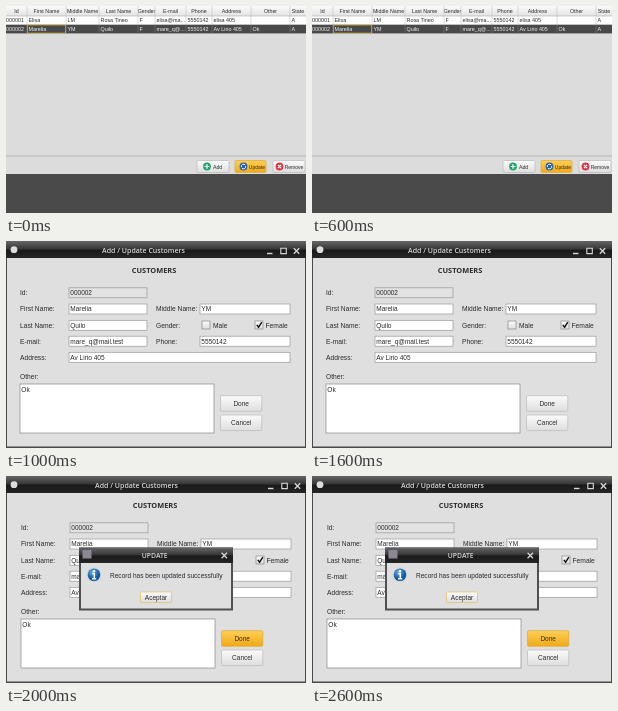
Write an HTML page that moves like this. It is 300 px wide and 207 px high and loops after 3000 ms.

```html
<!DOCTYPE html>
<html lang="en">
<head>
<meta charset="utf-8">
<title>Customer update</title>
<style>
  html, body { margin: 0; width: 100%; height: 100%; overflow: hidden; background: #dcdcdc; }
  svg { display: block; width: 100vw; height: 100vh; }
  text { font-family: "Liberation Sans", Arial, sans-serif; white-space: pre; }
  .title { font-family: "Open Sans", sans-serif; font-weight: 600; }
  .strong { font-family: "Open Sans", sans-serif; font-weight: 700; }
</style>
</head>
<body>
<svg id="stage" viewBox="0 0 300 207">
  <defs>
    <linearGradient id="bar" x2="0" y2="1">
      <stop offset="0" stop-color="#666"/><stop offset=".45" stop-color="#383838"/>
      <stop offset=".55" stop-color="#1a1a1a"/><stop offset="1" stop-color="#262626"/>
    </linearGradient>
    <linearGradient id="plain" x2="0" y2="1">
      <stop offset="0" stop-color="#fbfbfb"/><stop offset="1" stop-color="#dedede"/>
    </linearGradient>
    <linearGradient id="gold" x2="0" y2="1">
      <stop offset="0" stop-color="#ffcf55"/><stop offset="1" stop-color="#f0aa17"/>
    </linearGradient>
    <linearGradient id="head" x2="0" y2="1">
      <stop offset="0" stop-color="#fafafa"/><stop offset="1" stop-color="#e4e4e4"/>
    </linearGradient>
    <radialGradient id="blue" cx=".4" cy=".3">
      <stop offset="0" stop-color="#6fb4ee"/><stop offset="1" stop-color="#155a9e"/>
    </radialGradient>
  </defs>
</svg>
<script>
const stage = document.getElementById('stage');
const STEP = 1000;
const INK = '#2b2b2b', PALE = '#d8d8d8';

const rect = (x, y, w, h, fill, stroke = 'none', more = '') =>
  `<rect x="${x}" y="${y}" width="${w}" height="${h}" fill="${fill}" stroke="${stroke}" stroke-width=".7" ${more}/>`;
const text = (x, y, s, size = 6.6, fill = INK, more = '') =>
  `<text x="${x}" y="${y}" font-size="${size}" fill="${fill}" ${more}>${s}</text>`;
const mid = (x, y, s, size, fill, more = '') => text(x, y, s, size, fill, 'text-anchor="middle" ' + more);
const path = (d, stroke, width = 1) =>
  `<path d="${d}" fill="none" stroke="${stroke}" stroke-width="${width}"/>`;
const disc = (x, y, r, fill) => `<circle cx="${x}" cy="${y}" r="${r}" fill="${fill}"/>`;
const cross = (x, y, r, width, color = PALE) =>
  path(`M${x - r} ${y - r}l${2 * r} ${2 * r}m0 ${-2 * r}l${-2 * r} ${2 * r}`, color, width);
const button = (x, y, w, h, hot) =>
  rect(x, y, w, h, `url(#${hot ? 'gold' : 'plain'})`, hot ? '#dfa93a' : '#bababa', 'rx="1.2"');

const person = { id: '000002', first: 'Marelia', middle: 'YM', last: 'Quilo',
  mail: 'mare_q@mail.test', phone: '5550142', address: 'Av Lirio 405' };

function listScene() {
  const edges = [0, 21, 60, 93, 132, 149, 180, 206, 245, 284, 300];
  const heads = ['Id', 'First Name', 'Middle Name', 'Last Name', 'Gender', 'E-mail', 'Phone', 'Address', 'Other', 'State'];
  const rows = [
    ['000001', 'Elisa', 'LM', 'Rosa Tineo', 'F', 'elisa@ma...', '5550142', 'elisa 405', '', 'A'],
    [person.id, person.first, person.middle, person.last, 'F', 'mare_q@...', person.phone, person.address, 'Ok', 'A']
  ];
  const top = 10, high = 8.7, second = top + high, end = second + high;
  let s = rect(0, 0, 300, 207, '#dcdcdc') + rect(0, 0, 300, top, 'url(#head)') +
    rect(0, top, 300, high, '#fff') + rect(0, second, 300, high, '#494949');
  heads.forEach((h, i) => s += mid((edges[i] + edges[i + 1]) / 2, 7, h, 5.3));
  edges.slice(1, -1).forEach(x =>
    s += path(`M${x} 0V${second}`, '#c4c4c4', .6) + path(`M${x} ${second}V${end}`, '#777', .6));
  s += path(`M0 ${top}H300`, '#aaa', .6);
  rows.forEach((row, r) => row.forEach((c, i) =>
    s += text(edges[i] + (i ? 1.5 : 0), top + 6.4 + high * r, c, 5.4, r ? '#f4f4f4' : INK)));
  s += rect(21.3, second + .3, 38.4, high - .6, 'none', '#e0b83c') + path('M0 150H300', '#aaa', .8);
  s += button(191, 154.5, 32, 12) + button(229, 154.5, 31, 12, true) + button(267, 154.5, 32, 12);
  s += disc(201, 160.5, 3.9, '#23a66b') + path('M198.7 160.5h4.6m-2.3-2.3v4.6', '#fff', 1.2);
  s += disc(237.5, 160.5, 3.9, '#245fae') +
    path('M235.4 161a2.2 2.2 0 0 1 3.8-2m.4 1.2a2.2 2.2 0 0 1-3.8 2', '#fff', 1);
  s += disc(273.5, 160.5, 3.9, '#df3540') + cross(273.5, 160.5, 1.6, 1.2, '#fff');
  s += text(207, 162.6, 'Add', 5.2) + text(242.8, 162.6, 'Update', 5) + text(278.7, 162.6, 'Remove', 5);
  return s + rect(0, 168, 300, 39, '#4a4a4a');
}

function formScene(dx, titleX, hot) {
  const field = (x, y, w, s, fill = '#fff') => rect(x, y, w, 10, fill, '#999') + text(x + 1.3, y + 7.3, s, 6.5);
  const box = x => rect(x, 80, 8, 8, 'url(#plain)', '#888');
  const labels = [[14, 53.5, 'Id:'], [14, 70.3, 'First Name:'], [14, 86.5, 'Last Name:'], [14, 102.5, 'E-mail:'],
    [14, 118.8, 'Address:'], [14, 137.5, 'Other:'], [150, 70.3, 'Middle Name:'], [150, 86.5, 'Gender:'],
    [150, 102.5, 'Phone:'], [207, 86.5, 'Male'], [259.5, 86.5, 'Female']];
  let s = rect(0, 0, 300, 207, '#484848') + rect(1, 17, 298, 188.5, '#dfdfdf') + rect(0, 0, 300, 17, 'url(#bar)');
  s += disc(8, 8.7, 3.4, '#ddd') + mid(titleX, 12.3, 'Add / Update Customers', 7, PALE, 'class="title"');
  s += `<g transform="translate(${dx} 0)">`;
  s += path('M261 12.5h5.5', PALE, 1.4) + path('M274.8 7.3h5.5v5.3h-5.5z', PALE, 1.1) + cross(290.5, 10, 2.7, 1.3);
  s += mid(148, 31.6, 'CUSTOMERS', 7.4, INK, 'class="strong"');
  labels.forEach(l => s += text(...l, 6.7));
  s += field(63, 46.8, 78, person.id, '#e2e2e2') + field(63, 63, 78, person.first) + field(194, 63, 90, person.middle) +
    field(63, 79.3, 78, person.last) + field(63, 95.2, 78, person.mail) + field(194, 95.2, 90, person.phone) +
    field(63, 111.3, 221, person.address);
  s += box(196) + box(249) + path('M250.8 83.8l1.8 2.4 3.2-5', '#111', 1.4);
  s += rect(14, 143, 194, 49, '#fff', '#888') + text(15.3, 151, 'Ok');
  s += button(214.5, 154.7, 41.3, 15.6, hot) + mid(235.2, 165, 'Done', 6.5) +
    button(214.5, 174, 41.3, 15.6) + mid(235.2, 184.2, 'Cancel', 6.5);
  return s + '</g>';
}

function dialogScene() {
  return formScene(1, 130.5, true) +
    rect(73, 71.5, 154, 63, '#505050') + rect(75, 87, 150, 45.5, '#dfdfdf') +
    rect(73, 71.5, 154, 15.5, 'url(#bar)') + rect(76.5, 74, 9, 8.5, '#8d8791') +
    mid(148.7, 81.8, 'UPDATE', 6.8, PALE, 'class="title"') + cross(218.3, 79.5, 2.7, 1.3) +
    disc(88, 98.7, 7.4, '#ced6dc') + disc(88, 98.7, 6.3, 'url(#blue)') +
    disc(88, 95.3, 1.2, '#fff') + path('M86.3 97.7h2v5M86 102.7h4.2', '#fff', 1.5) +
    text(104, 102.3, 'Record has been updated successfully', 6.55) +
    rect(134.5, 116, 31, 10.5, 'url(#plain)', '#e4bf58', 'rx="1"') + mid(150, 123.6, 'Aceptar', 6.5);
}

const scenes = [listScene(), formScene(0, 137.5, false), dialogScene()].map(markup => {
  const g = document.createElementNS('http://www.w3.org/2000/svg', 'g');
  g.innerHTML = markup;
  return stage.appendChild(g);
});

function draw(ms) {
  const now = Math.floor(ms / STEP) % scenes.length;
  scenes.forEach((g, i) => g.style.display = i === now ? '' : 'none');
}

const start = performance.now();
function tick() {
  draw(performance.now() - start);
  requestAnimationFrame(tick);
}
tick();
</script>
</body>
</html>
```
